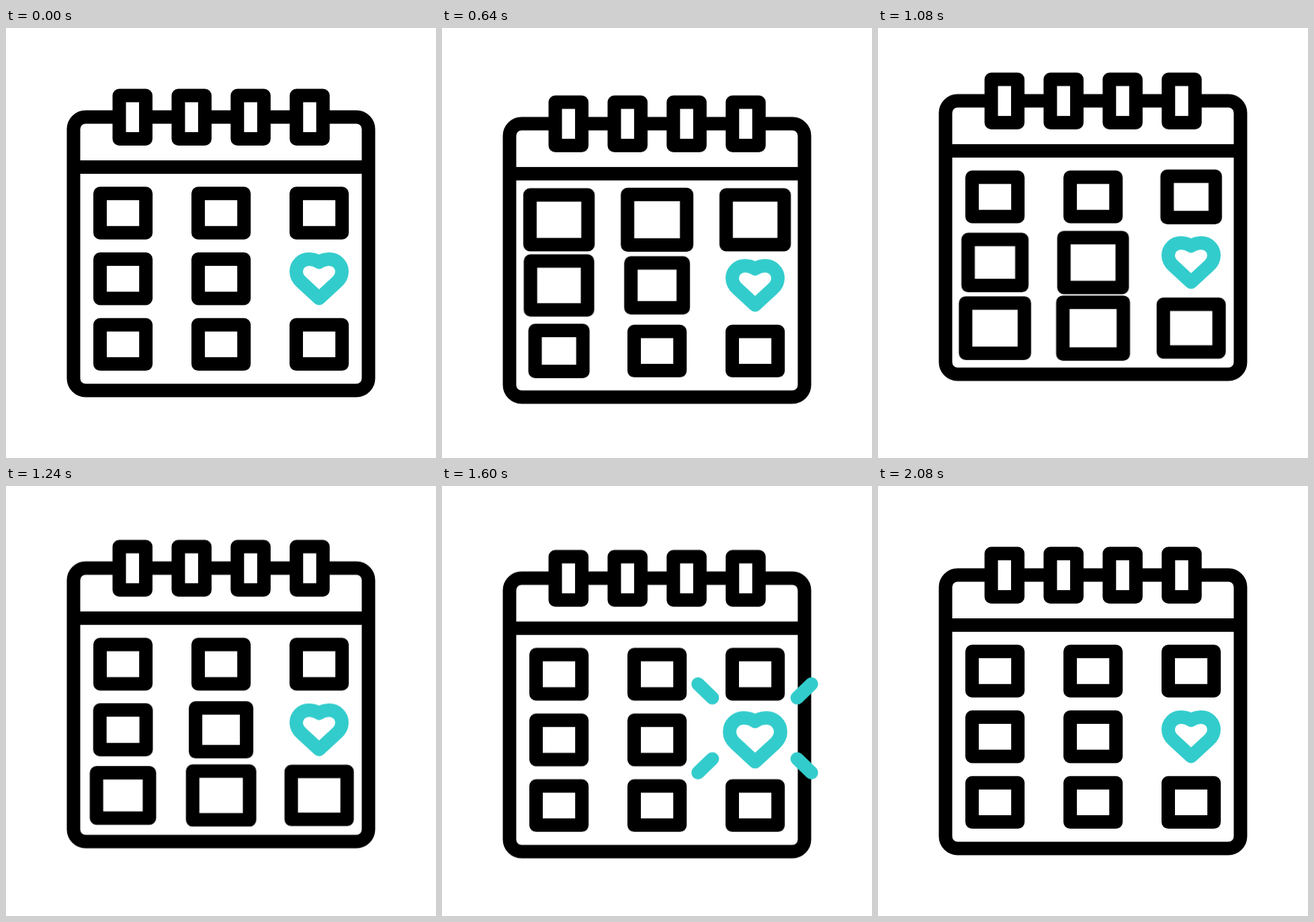
An HTML page for the animation above (2.2 s loop, 640 px wide and 640 px high).

```html
<!DOCTYPE html>
<html lang="en">
<head>
<meta charset="utf-8">
<title>Calendar</title>
<style>
  html, body { margin: 0; width: 100%; height: 100%; overflow: hidden; background: #fff; }
  svg { display: block; width: 100%; height: 100%; }
  svg * { vector-effect: non-scaling-stroke; }
  .ink, .accent { fill: none; stroke: #000; stroke-width: 20; stroke-linejoin: round; }
  .accent { stroke: #33cccc; stroke-linecap: round; }
  .ring { fill: #fff; }
  .pulse { transform-box: fill-box; transform-origin: center; }

  #calendar { animation: hop 2200ms infinite; }
  @keyframes hop {
    0% { transform: translateY(0); }
    2.73% { transform: translateY(0); animation-timing-function: cubic-bezier(.5, 0, .75, 1); }
    25.45% { transform: translateY(12px); animation-timing-function: cubic-bezier(.37, 0, .63, 1); }
    48.86% { transform: translateY(-24.2px); animation-timing-function: cubic-bezier(.37, 0, .63, 1); }
    64.77% { transform: translateY(6px); animation-timing-function: cubic-bezier(.37, 0, .63, 1); }
    90%, 100% { transform: translateY(0); }
  }

  /* Each ray grows outward, then its inner end follows. */
  .ray { animation: trim 2200ms linear infinite, show 2200ms step-end infinite; }
  @keyframes trim {
    0%, 61.14% { stroke-dasharray: 0 300; stroke-dashoffset: 0; }
    70% { stroke-dasharray: 68.4 300; stroke-dashoffset: 0; }
    74.1% { stroke-dasharray: 68.4 300; stroke-dashoffset: -31.6; }
    82.95%, 100% { stroke-dasharray: 0 300; stroke-dashoffset: -100; }
  }
  @keyframes show {
    0% { opacity: 0; }
    61.2% { opacity: 1; }
    82.9%, 100% { opacity: 0; }
  }
</style>
</head>
<body>
<svg viewBox="0 0 640 640">
  <g id="calendar">
    <g class="ink">
      <rect x="100.5" y="132.5" width="439" height="407" rx="18"/>
      <path d="M100.5 207H539.5"/>
      <g id="rings"></g>
      <g id="cells"></g>
    </g>
    <g class="accent">
      <path id="heart" class="pulse" d="M466 348.5C461.5 345.5 456 344 451 344C440 344 432 352.5 432 362.5
        C432 370 435.5 374.5 440 378.5L466 402.5L492 378.5C496.5 374.5 500 370 500 362.5
        C500 352.5 492 344 481 344C476 344 470.5 345.5 466 348.5Z"/>
      <path class="ray" pathLength="100" d="M409 317L378 287"/>
      <path class="ray" pathLength="100" d="M522 317L553 287"/>
      <path class="ray" pathLength="100" d="M409 395L378 425"/>
      <path class="ray" pathLength="100" d="M522 395L553 425"/>
    </g>
  </g>
</svg>
<script>
  const LOOP = 2200;

  function addRect(parent, cls, cx, cy, width, height) {
    const rect = document.createElementNS('http://www.w3.org/2000/svg', 'rect');
    const attrs = { class: cls, x: cx - width / 2, y: cy - height / 2, width, height };
    for (const key in attrs) rect.setAttribute(key, attrs[key]);
    return document.getElementById(parent).appendChild(rect);
  }

  // Swell to the peak and back along half a sine wave.
  function pulse(el, start, length, peak) {
    const rest = 'scale(1)';
    el.animate([
      { transform: rest, offset: 0 },
      { transform: rest, offset: start / LOOP, easing: 'cubic-bezier(.39, .575, .565, 1)' },
      { transform: `scale(${peak})`, offset: (start + length / 2) / LOOP, easing: 'cubic-bezier(.47, 0, .745, .715)' },
      { transform: rest, offset: (start + length) / LOOP },
      { transform: rest, offset: 1 }
    ], { duration: LOOP, iterations: Infinity });
  }

  for (let i = 0; i < 4; i++) addRect('rings', 'ring', 188.3 + 87.9 * i, 132.7, 39.5, 64.4);

  // column, row, start, length, peak
  [
    [0, 0, 142, 824, 1.28], [1, 0, 250, 779, 1.29], [2, 0, 337, 798, 1.28],
    [0, 1, 395, 856, 1.3], [1, 1, 522, 821, 1.32],
    [0, 2, 604, 775, 1.3], [1, 2, 730, 701, 1.32], [2, 2, 828, 687, 1.23]
  ].forEach(([col, row, ...timing]) => {
    const cell = addRect('cells', 'pulse', 174.1 + 146 * col, 275.5 + 97.7 * row, 68.2, 58.4);
    pulse(cell, ...timing);
  });

  pulse(document.getElementById('heart'), 1260, 440, 1.18);
</script>
</body>
</html>
```
